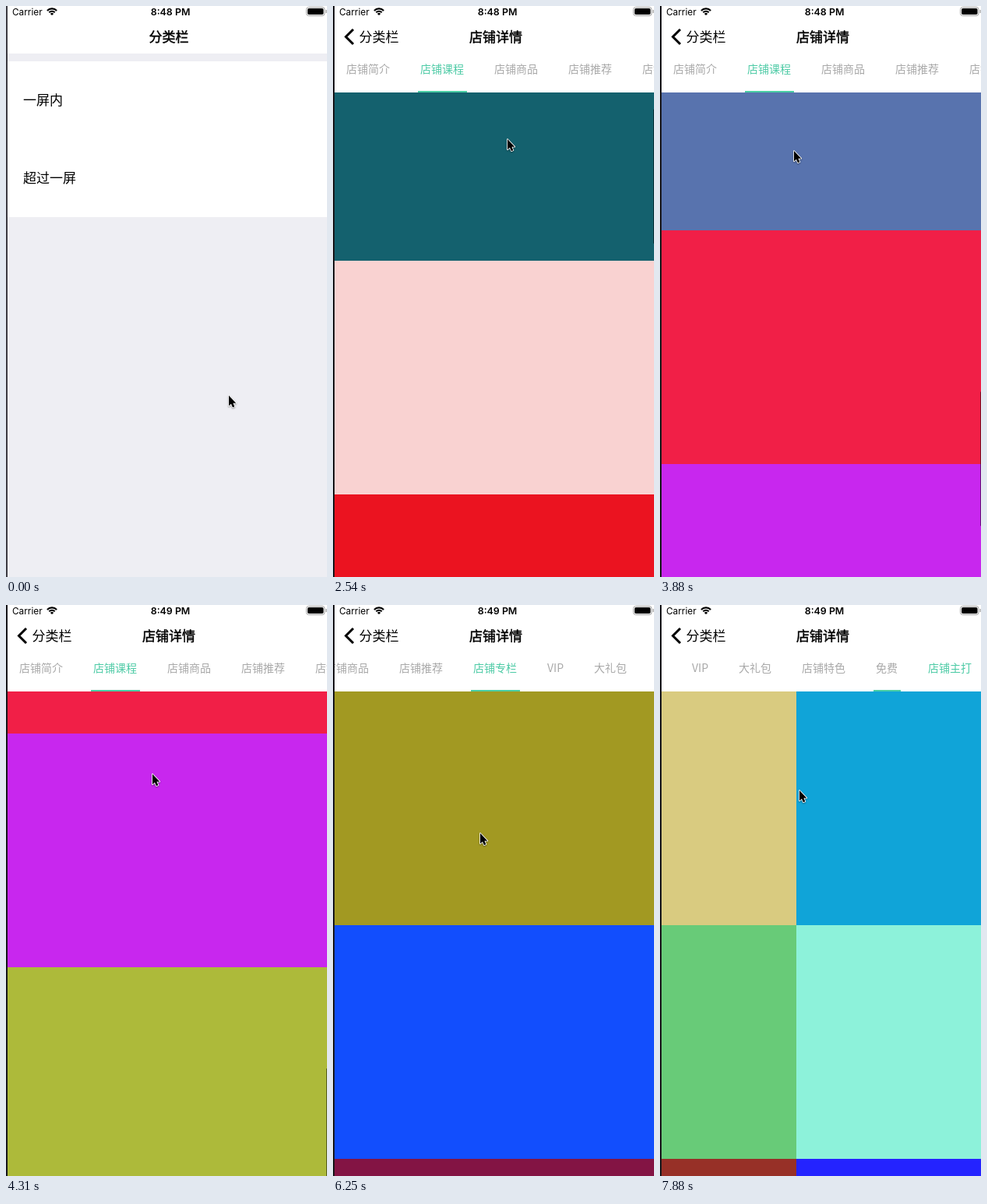
Animation of 412x733 px, one loop 8000 ms. Source, as an HTML page with a canvas:

```html
<!DOCTYPE html>
<html lang="zh-CN">
<head>
<meta charset="utf-8">
<style>
html, body { margin: 0; width: 100%; height: 100%; overflow: hidden; background: #fff; }
canvas { display: block; width: 412px; height: 733px; }
</style>
</head>
<body>
<canvas id="stage"></canvas>
<script>
const W = 412, H = 733, LOOP = 8000, TICK = 148.7;
const EDGE = 2, NAV = 61, PAGE = W - EDGE, ROW = 300;
const CJK = '"Noto Sans CJK SC", "Noto Sans CJK", "Noto Sans", sans-serif';
const LATIN = 'Inter, "Liberation Sans", sans-serif';

const canvas = document.getElementById('stage');
const dpr = window.devicePixelRatio || 1;
canvas.width = W * dpr;
canvas.height = H * dpr;
const c = canvas.getContext('2d');

const clamp = (v, a = 0, b = 1) => Math.min(b, Math.max(a, v));
const mix = (a, b, k) => a + (b - a) * k;
const smooth = k => k * k * (3 - 2 * k);
const easeOut = k => 1 - (1 - k) ** 3;
const bump = z => Math.exp(-z * z);

// Tabs laid out left to right with an even gap
const tabs = [];
let tabX = 17;
for (const label of '店铺简介 店铺课程 店铺商品 店铺推荐 店铺专栏 VIP 大礼包 店铺特色 免费 店铺主打'.split(' ')) {
  const w = label.length * (label === 'VIP' ? 7 : 14);
  tabs.push({ label, x: tabX, w });
  tabX += w + 39;
}
const TAB_MAX = tabX - 39 + 10 - PAGE;

const rows = {
  1: ['#14616e', '#f9d2d1', '#eb1320', '#25bad8', '#c77bae', '#5873ae', '#f11f47', '#c827ee', '#adba3a', '#48d27b'],
  2: ['#80dace', '#2dfb05', '#d84a06'],
  4: ['#a29922', '#124efd', '#831444'],
  8: ['#d9cb80', '#68cb78', '#973027'],
  9: ['#10a4d8', '#8df2da', '#2423ff']
};

// Vertical flicks: start time and distance
const FLICK = 800;
const flicks = [[2390, 880], [3430, 1148], [4080, 490]];

// Times halfway through each sideways swipe: three slow, then five quick
const swipes = Array.from({ length: 8 }, (_, i) => i < 3 ? 4873 + 464 * i : 6520 + 335.25 * (i - 3));

// Resting points of the pointer: time, x, y
const rests = [
  [0, 286, 500], [890, 179, 238], [1640, 179, 238], [2390, 224, 166], [3271, 224, 166],
  [3866, 172, 186], [5056, 222, 285], [6250, 188, 293], [7880, 210, 310]
];

const scrollAt = t => Math.round(flicks.reduce((s, [at, d]) => s + d * easeOut(clamp((t - at) / FLICK)), 0));
const pageAt = t => swipes.reduce((p, h) => p + clamp(1.04 / (1 + Math.exp((h - t) / 66)) - 0.02), 1);
const tabScroll = tab => clamp(tab.x + tab.w / 2 - 208, 0, TAB_MAX);

function pointerAt(t) {
  const i = clamp(rests.findIndex(r => r[0] > t), 1, rests.length - 1);
  const a = rests[i - 1], b = rests[i];
  const k = smooth(clamp((t - a[0]) / (b[0] - a[0])));
  const right = swipes.reduce((s, h) => s + bump((t - h + 150) / 60), 0);
  const down = flicks.reduce((s, [at]) => s + bump((t - at) / 70), 0);
  return [mix(a[1], b[1], k) + 90 * right, mix(a[2], b[2], k) + 240 * down];
}

function rect(x, y, w, h, color) {
  c.fillStyle = color;
  c.fillRect(x, y, w, h);
}

function text(s, x, y, size, color, weight = 400, font = CJK, align = 'left') {
  c.font = `${weight} ${size}px ${font}`;
  c.textAlign = align;
  c.fillStyle = color;
  c.fillText(s, x, y);
}

// Medium weight: regular glyphs with a thin outline
function title(s, x) {
  text(s, x, 46, 17, '#000', 400, CJK, 'center');
  c.strokeStyle = '#000';
  c.lineWidth = 0.45;
  c.strokeText(s, x, 46);
}

function line(points, color, width = 1) {
  c.beginPath();
  points.forEach(([x, y]) => c.lineTo(x, y));
  c.strokeStyle = color;
  c.lineWidth = width;
  c.stroke();
}

function clipped(x, y, w, h, draw) {
  c.save();
  c.beginPath();
  c.rect(x, y, w, h);
  c.clip();
  draw();
  c.restore();
}

function rowColor(page, i) {
  const known = rows[page];
  if (known && known[i]) return known[i];
  const r = Math.abs(Math.sin(page * 12.99 + i * 78.23) * 43758.5) % 1;
  return `hsl(${r * 360}, 70%, 52%)`;
}

function menu(x) {
  rect(EDGE, NAV, PAGE, H - NAV, '#eeeef3');
  rect(x, 71, PAGE, 200, '#fff');
  text('一屏内', x + 20, 127, 17, '#000');
  text('超过一屏', x + 20, 227, 17, '#000');
}

function mail() {
  c.beginPath();
  c.roundRect(13.5, 96.5, 19, 16, 3);
  c.strokeStyle = '#333';
  c.lineWidth = 1.2;
  c.stroke();
  line([[15, 99], [23, 105], [31, 99]], '#333', 1.2);
  rect(34, 92, 8, 8, '#ff625f');
}

function coin() {
  const violet = '#a99cea';
  c.beginPath();
  c.arc(71, 312.5, 11.5, 0, 7);
  c.strokeStyle = violet;
  c.lineWidth = 1.2;
  c.stroke();
  c.beginPath();
  c.arc(71, 312.5, 8.5, 0, 7);
  c.fillStyle = '#d6d0f6';
  c.fill();
  text('¥', 71, 317, 12, '#fff', 700, LATIN, 'center');
  line([[61, 324.5], [66, 323], [76, 323], [81, 324.5]], violet, 1.3);
}

function chart() {
  const coral = '#f08a86', pale = '#f9c9c7';
  for (let i = 0; i < 4; i++) {
    const h = 8 + 2 * i, x = 272.5 + i * 5.6;
    rect(x, 322 - h, 4, h, pale);
    line([[x, 322], [x, 322 - h]], coral);
  }
  line([[271, 322.5], [294, 322.5]], pale);
  line([[271, 313], [279, 305], [285, 310], [294, 303]], coral, 1.2);
  line([[289.5, 302.5], [294.5, 302.5], [294.5, 307]], coral, 1.2);
}

function header(scroll) {
  c.save();
  c.translate(0, -scroll);
  mail();
  coin();
  chart();
  text('会员', 201, 222, 11, '#b4b4b4');
  text('累计收益', 93, 308, 13, '#444');
  text('累计销量', 305, 308, 13, '#444');
  rect(EDGE, 348, PAGE, 10, '#f5f5fa');
  c.restore();
}

function tabBar(t, top, lag) {
  const n = swipes.filter(h => h <= t).length;
  const since = n ? t - swipes[n - 1] : 0;
  const to = tabs[n + 1], from = n ? tabs[n] : to;
  const k = clamp((since - 20) / 223);
  const off = Math.round(mix(tabScroll(from), tabScroll(to), clamp(since / 150)));
  rect(EDGE, top, PAGE, 50, '#fff');
  for (const tab of tabs) {
    text(tab.label, tab.x - off, top + 25, 14, tab === to ? '#4ecba6' : '#a9a9a9');
  }
  rect(Math.round(mix(from.x, to.x, k) - 3 - off - lag), top + 48, mix(from.w, to.w, k) + 7, 2, '#4bcfa5');
}

function pages(t, top, scroll) {
  const pos = pageAt(t), first = Math.floor(pos);
  for (let p = first; p <= first + 1 && p < tabs.length; p++) {
    const x = EDGE + Math.round((p - pos) * PAGE);
    const y0 = p === 1 ? 408 - scroll : 111;
    for (let i = 0; i < 10; i++) {
      const y = y0 + i * ROW;
      if (y < H && y + ROW > top) rect(x, y, PAGE, ROW, rowColor(p, i));
    }
  }
  const inner = scroll - 297;
  if (inner > 0 && pos === 1) rect(W - 1, 113 + inner * 0.2356, 1, 172, 'rgba(0,0,0,.5)');
}

function shop(t, dx, p) {
  const scroll = scrollAt(t);
  const top = Math.max(NAV, 358 - scroll);
  c.save();
  c.translate(dx, 0);
  rect(EDGE, NAV, PAGE, H - NAV, '#fff');
  clipped(EDGE, NAV, PAGE, H, () => header(scroll));
  clipped(EDGE, top + 50, PAGE, H, () => pages(t, top + 50, scroll));
  clipped(EDGE, top, PAGE, 50, () => tabBar(t, top, 19 * (1 - p)));
  c.restore();
}

function wifi(x, y) {
  const arc = r => c.arc(x, y, r, Math.PI * 1.25, Math.PI * 1.75);
  c.lineWidth = 2.2;
  c.strokeStyle = c.fillStyle = '#000';
  for (const r of [5.2, 8.6]) {
    c.beginPath();
    arc(r);
    c.stroke();
  }
  c.beginPath();
  c.moveTo(x, y);
  arc(3);
  c.fill();
}

function battery() {
  c.beginPath();
  c.roundRect(385.5, 1.5, 23.5, 11, 3);
  c.strokeStyle = '#a0a0a0';
  c.lineWidth = 1;
  c.stroke();
  c.beginPath();
  c.roundRect(387, 3, 20.5, 8, 1.8);
  c.fillStyle = '#000';
  c.fill();
  rect(410.5, 5, 1.2, 4, '#a0a0a0');
}

function navBar(t, p) {
  rect(EDGE, 0, PAGE, NAV, '#fff');
  if (p === 0) {
    title('分类栏', 209);
  } else {
    const q = (1 - p) ** 0.92;
    c.globalAlpha = p;
    line([[26, 30], [16.5, 39.5], [26, 49]], '#000', 3);
    title('店铺详情', 209 + 230 * q);
    text('分类栏', 33.5 + 149 * q, 46, 17, '#000');
    c.globalAlpha = 1;
  }
  text('Carrier', 8, 12, 11.8, '#000', 400, LATIN);
  text(t < 4150 ? '8:48 PM' : '8:49 PM', 211, 12, 12.4, '#000', 600, LATIN, 'center');
  wifi(59, 12);
  battery();
}

function pointer(x, y) {
  c.save();
  c.translate(Math.round(x), Math.round(y));
  c.scale(0.92, 0.95);
  c.beginPath();
  [[0, 0], [0, 14], [3.2, 11.2], [5.4, 16], [8, 15], [5.9, 10.2], [10, 10.2]]
    .forEach(([px, py]) => c.lineTo(px, py));
  c.closePath();
  c.lineJoin = 'round';
  c.lineWidth = 1.8;
  c.strokeStyle = '#fff';
  c.shadowColor = 'rgba(0,0,0,.4)';
  c.shadowBlur = 2 * dpr;
  c.shadowOffsetY = dpr;
  c.stroke();
  c.shadowColor = 'transparent';
  c.fillStyle = '#000';
  c.fill();
  c.restore();
}

function draw(t) {
  const p = t < 1290 ? 0 : t > 2000 ? 1 : 1 - Math.exp((1290 - t) / 108.6);
  const dx = Math.round(PAGE * (1 - p));
  c.setTransform(dpr, 0, 0, dpr, 0, 0);
  if (p < 1) {
    menu(EDGE - Math.round(0.3 * PAGE * p));
    rect(EDGE, NAV, PAGE, H - NAV, `rgba(0,0,0,${0.1 * p})`);
    const shade = c.createLinearGradient(dx - 5, 0, dx + EDGE, 0);
    shade.addColorStop(0, 'rgba(0,0,0,0)');
    shade.addColorStop(1, 'rgba(0,0,0,.05)');
    if (p > 0) rect(dx - 5, NAV, 7, H, shade);
  }
  if (p > 0) shop(t, dx, p);
  navBar(t, p);
  rect(0, 0, EDGE, H, p ? '#17161a' : '#3e3c43');
  pointer(...pointerAt(t));
}

// The picture advances in even ticks
const start = performance.now();
function loop() {
  const t = (performance.now() - start) % LOOP;
  draw(Math.floor((t + 10) / TICK) * TICK);
  requestAnimationFrame(loop);
}
loop();
</script>
</body>
</html>
```
